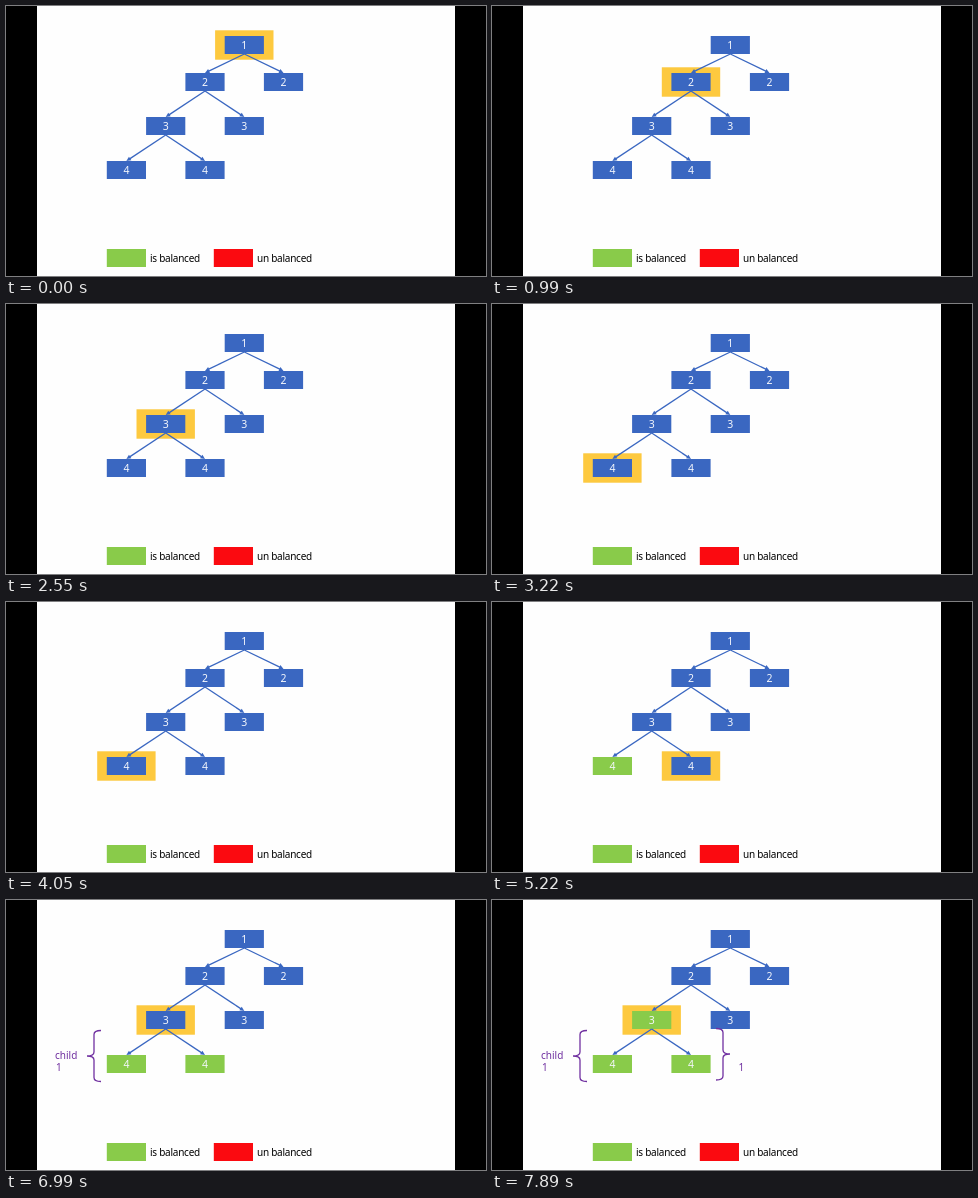
An HTML page that plays this animation: 480 px wide and 270 px high, repeating every 7990 ms.

```html
<!DOCTYPE html>
<html lang="en">
<head>
<meta charset="utf-8">
<title>Balanced tree check</title>
<style>
html, body { margin: 0; width: 100%; height: 100%; overflow: hidden; background: #000; }
svg { display: block; width: 100vw; height: 100vh; }
text { font: 10px "Noto Sans", "Open Sans", sans-serif; }
.label { letter-spacing: -.25px; }
.digit { fill: #f4f7fc; text-anchor: middle; font-size: 10.5px; }
.note { fill: #7030a0; }
.brace { fill: none; stroke: #7030a0; stroke-width: 1.3; }
</style>
</head>
<body>
<svg id="stage" viewBox="0 0 480 270"></svg>
<script>
const LOOP = 7990;
const BLUE = '#3a67c1', GREEN = '#89cb4a', RED = '#fb0a10', GOLD = '#fdc93f';
const stage = document.getElementById('stage');

function add(tag, attrs, text) {
  const el = document.createElementNS('http://www.w3.org/2000/svg', tag);
  for (const key in attrs) el.setAttribute(key, attrs[key]);
  if (text) el.textContent = text;
  return stage.appendChild(el);
}

const box = (x, y, width, height, fill) => add('rect', { x, y, width, height, fill });
const write = (x, y, text, cls) => add('text', { x, y, class: cls }, text);

// x, y, value, parent index, time it turns green
const nodes = [
  [238.3, 39, 1],
  [199, 76, 2, 0],
  [277.5, 76, 2, 0],
  [159.7, 120, 3, 1, 7550],
  [238.3, 120, 3, 1],
  [120.4, 164, 4, 3, 4150],
  [199, 164, 4, 3, 6320]
].map(([x, y, value, parent, done = Infinity]) => ({ x, y, value, parent, done }));

// time, visited node index
const visits = [[0, 0], [890, 1], [1800, 3], [2900, 5], [4600, 6], [6480, 3]];

function edge(from, to) {
  const x1 = from.x, y1 = from.y + 9, x2 = to.x, y2 = to.y - 9;
  const angle = Math.atan2(y2 - y1, x2 - x1);
  const ex = x2 - 3 * Math.cos(angle), ey = y2 - 3 * Math.sin(angle);
  add('path', { d: `M${x1} ${y1}L${ex} ${ey}`, stroke: BLUE, 'stroke-width': 1.3 });
  add('path', {
    d: 'M0 0L-4.5 -2.2V2.2Z', fill: BLUE,
    transform: `translate(${x2} ${y2}) rotate(${angle * 180 / Math.PI})`
  });
}

function brace(x, top, mid, bottom, side) {
  const h = side * 7, q = side * 3;
  return add('path', {
    class: 'brace',
    d: `M${x - h} ${top}Q${x} ${top} ${x} ${top + 4}V${mid - 4}Q${x} ${mid} ${x + h} ${mid}` +
       `Q${x} ${mid} ${x} ${mid + 4}V${bottom - 4}Q${x} ${bottom} ${x - h} ${bottom}`
  });
}

box(31, 0, 418, 270, '#fefefe');
const halo = box(0, 0, 58.4, 29.4, GOLD);

for (const n of nodes) {
  n.rect = box(n.x - 19.6, n.y - 9, 39.2, 18, BLUE);
  add('text', { x: n.x, y: n.y + 4, class: 'digit' }, n.value);
}
for (const n of nodes) if (n.parent !== undefined) edge(nodes[n.parent], n);

box(100.8, 243, 39.2, 18, GREEN);
write(144, 256, 'is balanced', 'label');
box(207.8, 243, 39.2, 18, RED);
write(251, 256, 'un balanced', 'label');

const notes = [
  [6600, brace(88, 130.5, 156, 181.5, -1)],
  [6600, write(49, 159, 'child', 'note')],
  [6600, write(50, 171, '1', 'note')],
  [7050, brace(231, 128.5, 154, 180, 1)],
  [7050, write(246.5, 171, '1', 'note')]
];

function draw(t) {
  const index = visits.filter(v => v[0] <= t).pop()[1];
  halo.setAttribute('x', nodes[index].x - 29.2);
  halo.setAttribute('y', nodes[index].y - 14.7);
  for (const n of nodes) n.rect.setAttribute('fill', t >= n.done ? GREEN : BLUE);
  for (const [start, el] of notes) el.setAttribute('visibility', t >= start ? 'visible' : 'hidden');
}

const begin = performance.now();
function tick() {
  draw((performance.now() - begin) % LOOP);
  requestAnimationFrame(tick);
}
tick();
</script>
</body>
</html>
```
